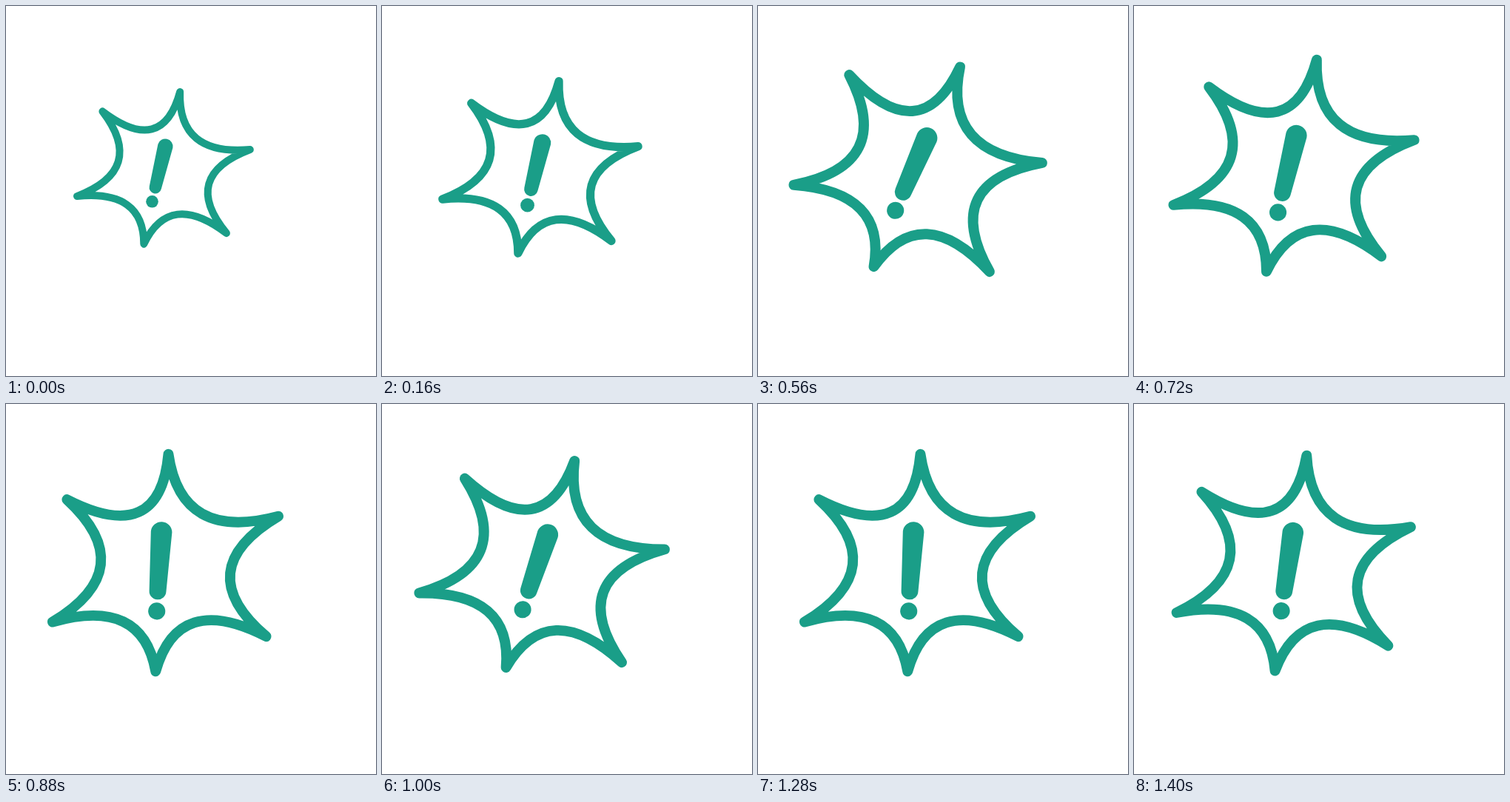
An HTML page that plays this animation: 500 by 500 pixels, repeating every 1440 ms.

```html
<!DOCTYPE html>
<html lang="en">
<head>
<meta charset="utf-8">
<title>Alert burst</title>
<style>
  html, body { margin: 0; width: 100%; height: 100%; overflow: hidden; background: #fff; }
  svg { display: block; width: 100%; height: 100%; }
</style>
</head>
<body>
<svg viewBox="0 0 500 500">
  <g id="burst" fill="#1a9e88">
    <path fill="none" stroke="#1a9e88" stroke-width="10" stroke-linejoin="round" stroke-linecap="round"
      d="M235.1 116.1
         Q232.3 202.6 329.8 194
         Q234.6 230 297.9 307
         Q221.2 248.9 186.3 321.7
         Q186.2 248 96 257.1
         Q190.2 220.8 130.4 142.4
         Q211.2 203.5 235.1 116.1Z"/>
    <path d="M205.4 186.8A10.3 10.3 0 0 1 225.4 191.6L209.8 247.2A8.2 8.2 0 0 1 193.8 243.4Z"/>
    <circle cx="197.5" cy="264.3" r="8.3"/>
  </g>
</svg>
<script>
const LOOP = 1440, STEP = 40, GROW = 480, SWING = 480;
const MAX_SCALE = 1.391, MAX_ANGLE = 15;
const CX = 205, CY = 227;
const burst = document.getElementById('burst');

// Triangle wave 0 -> 1 -> 0 -> -1 -> 0 over one unit
function triangle(u) {
  const p = (u + 0.25) % 1;
  return 1 - 4 * Math.abs(p - 0.5);
}

function draw(ms) {
  const t = Math.floor((ms % LOOP) / STEP) * STEP;
  const scale = 1 + (MAX_SCALE - 1) * Math.min(t / GROW, 1);
  const angle = t > GROW ? MAX_ANGLE * triangle((t - GROW) / SWING) : 0;
  burst.setAttribute('transform',
    `translate(${CX} ${CY}) rotate(${angle}) scale(${scale}) translate(${-CX} ${-CY})`);
}

const start = performance.now();
function tick() {
  draw(performance.now() - start + 1);
  requestAnimationFrame(tick);
}
draw(0);
requestAnimationFrame(tick);
</script>
</body>
</html>
```
